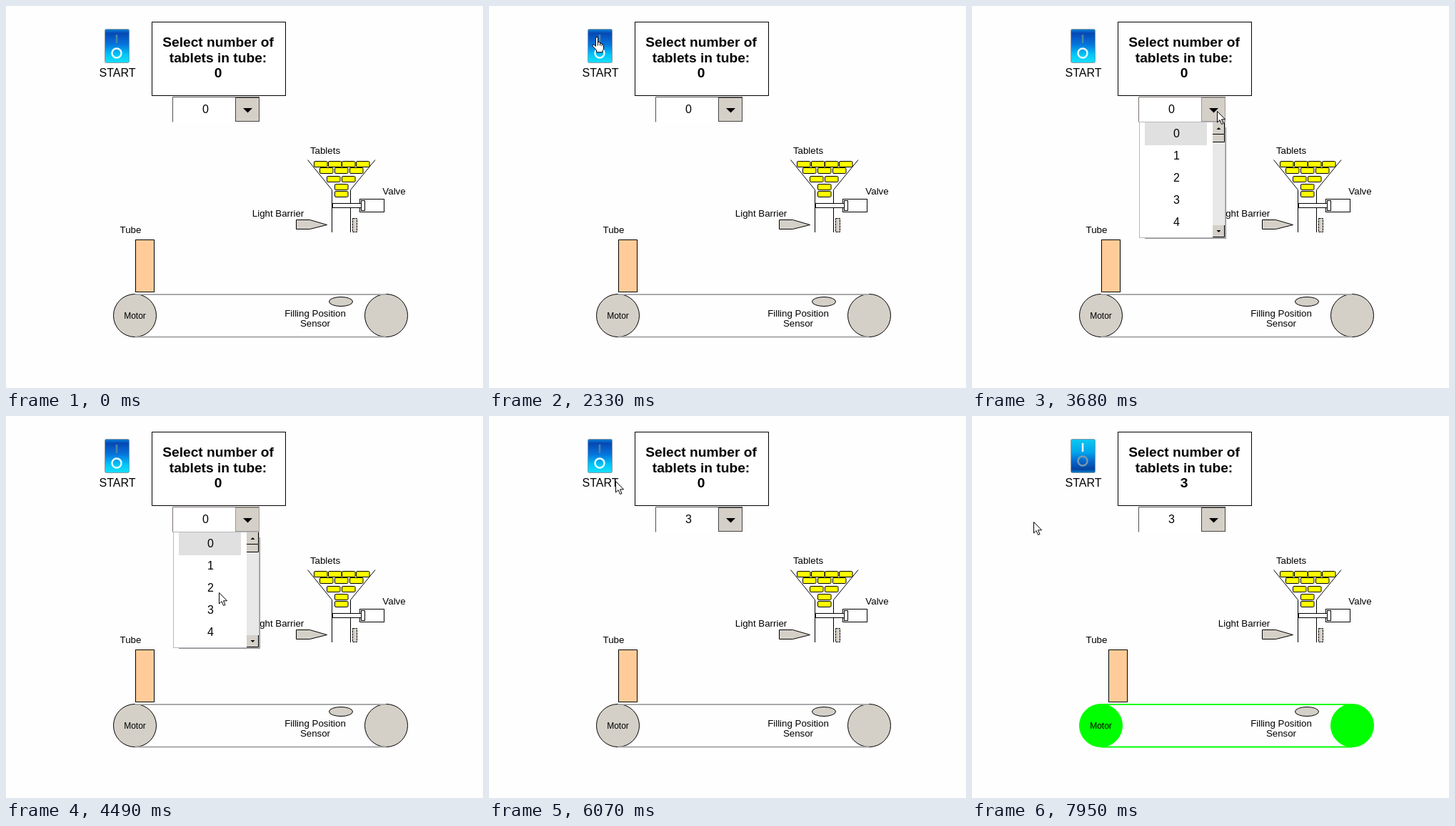
Write an HTML page that moves like this. It is 668x535 px and loops after 8 s.

```html
<!DOCTYPE html>
<html lang="en">
<head>
<meta charset="utf-8">
<title>Tablet filling line</title>
<style>
  html, body { margin: 0; width: 100%; height: 100%; overflow: hidden; background: #fefefe; }
  svg { display: block; width: 668px; height: 535px; }
  text { font-family: "Liberation Sans", Arial, sans-serif; font-size: 13.3px; text-anchor: middle; }
  .big { font-size: 16px; }
  .title { font-size: 19.2px; font-weight: bold; }
  .line { fill: none; stroke: #000; }
  .box { fill: #fff; stroke: #000; }
  .metal { fill: #d4d0c8; stroke: #000; }
  .wheel { fill: #d4d0c8; stroke: #000; }
  .belt { stroke: #a9a9ac; stroke-width: 2; }
  .running .wheel { fill: #0f0; stroke: #0f0; }
  .running .belt { stroke: #0f0; }
  .tablet { fill: #ff0; stroke: #000; }
</style>
</head>
<body>
<svg viewBox="0 0 668 535">
  <defs>
    <linearGradient id="glow" x2="0" y2="1">
      <stop offset="0" stop-color="#0a86d8"/>
      <stop offset=".12" stop-color="#0648b4"/>
      <stop offset=".45" stop-color="#0674dc"/>
      <stop offset=".75" stop-color="#00c4f8"/>
      <stop offset="1" stop-color="#18e0f8"/>
    </linearGradient>
    <linearGradient id="glowOn" x2="0" y2="1">
      <stop offset="0" stop-color="#10c8f0"/>
      <stop offset=".4" stop-color="#00a4ec"/>
      <stop offset=".65" stop-color="#0668cc"/>
      <stop offset=".9" stop-color="#0444a0"/>
      <stop offset="1" stop-color="#0a86d0"/>
    </linearGradient>
  </defs>

  <rect id="face" x="138.5" y="32.5" width="34" height="47" rx="2" stroke="#8a9ca8"/>
  <path id="onMark" d="M155 40V52" stroke-width="2.5"/>
  <circle id="offMark" cx="155" cy="66" r="6.5" fill="none" stroke-width="2.5"/>
  <text class="big" x="156" y="99">START</text>

  <rect class="box" x="204.5" y="22.5" width="187" height="103"/>
  <text class="title" x="297" y="57">Select number of</text>
  <text class="title" x="297" y="79">tablets in tube:</text>
  <text class="title" id="count" x="297" y="100">0</text>

  <text x="447" y="207">Tablets</text>
  <g id="tablets"></g>
  <path class="line" d="M422.5 215.5L456.5 257.5V317M517 215.5L482.5 257.5V317"/>
  <rect class="box" x="495.5" y="270.5" width="34" height="18"/>
  <rect class="box" x="457.5" y="276.5" width="40" height="6"/>
  <rect class="box" x="497.5" y="272.5" width="5" height="14"/>
  <text x="543.5" y="264">Valve</text>
  <text x="381" y="295">Light Barrier</text>
  <path class="metal" d="M406.5 299.5H425.5L449.5 306.5L425.5 312.5H406.5Z"/>
  <rect class="metal" x="485.5" y="297.5" width="6" height="19" stroke-dasharray="3 1"/>

  <text x="174.5" y="318">Tube</text>
  <rect id="tube" x="181.5" y="327.5" width="26" height="73" fill="#fc9" stroke="#000"/>
  <g id="conveyor">
    <circle class="wheel" cx="180.5" cy="433.5" r="30"/>
    <circle class="wheel" cx="532.5" cy="433.5" r="30"/>
    <path class="belt" d="M181 404H532M181 463.5H532"/>
  </g>
  <text x="180.5" y="438" style="font-size:12px">Motor</text>
  <ellipse class="metal" cx="469" cy="414" rx="16.5" ry="6.5"/>
  <text x="433" y="435">Filling Position</text>
  <text x="433" y="449">Sensor</text>

  <rect x="233" y="127" width="123" height="35" fill="#fff"/>
  <path id="frame" d="M233.5 162.5V127.5H355" fill="none"/>
  <rect id="arrowButton" x="321.5" y="128.5" width="33" height="33" fill="#d4d0c8"/>
  <path d="M332 143H345L338.5 149.5Z"/>
  <text class="big" id="value" x="279.5" y="150">0</text>

  <g id="list">
    <path d="M242 325.5H355.5V170" fill="none" stroke="#8c8c8c"/>
    <rect x="234.5" y="162.5" width="120" height="162" fill="#fff" stroke="#b8b8c0"/>
    <rect id="highlight" x="242" y="163" width="87" height="32" fill="#e0e0e0"/>
    <g id="options"></g>
    <rect x="337" y="163" width="17" height="161" fill="#e8e8e8"/>
    <g fill="#d4d0c8">
      <path d="M337 163H354V179H337ZM337 180H354V190H337ZM337 307H354V323H337Z"/>
    </g>
    <path class="line" d="M337 179.5H353.5V163M337 190.5H353.5V180M337 323.5H353.5V307"/>
    <path d="M342.5 173H348.5L345.5 170ZM342.5 314H348.5L345.5 317Z"/>
  </g>

  <g id="cursor" fill="#fff" stroke="#000" stroke-linejoin="round">
    <path id="arrow" d="M.5 .5V16L4 12.6L6.6 18.5L9 17.5L6.5 11.8H11.5Z"/>
    <path id="hand" transform="translate(-5)" d="M5.5 13V2q0-1.5 1.5-1.5T8.5 2V9V8q1.5-1.2 3 0v1.5q1.5-1 2.6 .3v1q2.2-.6 2.4 1v4.5q0 2-1.5 3.5v2H6.5V19L1.2 13.2q-.8-1.6 .6-2.2 1.5-.3 3.7 2.5zM8.5 9v3.5M11.5 9.5v3M14.1 10.8v2.5"/>
  </g>
</svg>
<script>
const $ = id => document.getElementById(id);
const LOOP = 8000;
const STARTED = 7320;

const tabletRows = [[218, 431, 451, 470, 490], [227, 439, 460, 481], [239, 449, 470], [250, 460], [260, 460]];
$('tablets').innerHTML = tabletRows.map(([y, ...xs]) => xs.map(x =>
  `<rect class="tablet" x="${x + .5}" y="${y - .5}" width="18.5" height="8" rx="1.5"/>`).join('')).join('');
$('options').innerHTML = [0, 1, 2, 3, 4].map(n =>
  `<text class="big" x="286.5" y="${184 + 31 * n}">${n}</text>`).join('');

// Each move: start, end, number of steps, from x, y, to x, y
const moves = [
  [770, 770, 1, 34, 465, 34, 465],
  [1760, 2330, 13, -12, -4, 149, 43],
  [2550, 3180, 13, 149, 43, 334, 144],
  [3400, 3490, 3, 334, 144, 343, 147],
  [3910, 4490, 13, 343, 147, 298, 247],
  [4850, 5070, 5, 298, 247, 290, 264],
  [5800, 6070, 7, 290, 264, 177, 91],
  [6110, 6200, 2, 177, 91, 149, 27],
  [6870, 7000, 3, 153, 16.5, 153, 48],
  [7770, 7950, 5, 153, 48, 86, 148]
];
const within = (t, from, to) => t >= from && t < to;
const show = (id, on) => $(id).setAttribute('visibility', on ? 'visible' : 'hidden');
const set = (id, attrs) => { for (const k in attrs) $(id).setAttribute(k, attrs[k]); };

function drawCursor(t) {
  const visible = within(t, 770, 810) || within(t, 1760, 6420) || t >= 6870;
  $('cursor').style.display = visible ? '' : 'none';
  if (!visible) return;
  const [start, end, steps, x0, y0, x1, y1] = moves.findLast(m => m[0] <= t);
  const step = end > start ? Math.floor((t - start) / (end - start) * (steps - 1) + 1e-6) + 1 : steps;
  const p = Math.min(1, step / steps);
  const x = Math.round(x0 + (x1 - x0) * p), y = Math.round(y0 + (y1 - y0) * p);
  const overButton = within(x, 136, 175) && within(y, 26, 81);
  set('cursor', { transform: `translate(${x} ${y})` });
  show('hand', overButton || t < 810);
  show('arrow', !(overButton || t < 810));
}

function drawSwitch(on) {
  set('face', { fill: on ? 'url(#glowOn)' : 'url(#glow)' });
  set('onMark', { stroke: on ? '#fff' : '#4c84a8', transform: `translate(0 ${on ? -2 : 0})` });
  set('offMark', { stroke: on ? '#7898b0' : '#e8fcff', transform: `translate(0 ${on ? -3 : 0})` });
}

function drawSelector(t) {
  const open = within(t, 3680, 5430);
  $('list').style.display = open ? '' : 'none';
  set('highlight', { y: t >= 5300 ? 256 : 163 });
  set('frame', { stroke: open ? '#77706c' : '#505050' });
  set('arrowButton', { stroke: open ? '#a09a94' : '#484440' });
  $('value').textContent = t >= 5430 ? 3 : 0;
}

function draw(t) {
  const running = t >= STARTED;
  drawSwitch(running);
  drawSelector(t);
  $('count').textContent = running ? 3 : 0;
  $('conveyor').classList.toggle('running', running);
  const tubeShift = running ? 2 + 4 * Math.floor((t - STARTED) / 220) : 0;
  set('tube', { x: 181.5 + Math.min(tubeShift, 10) });
  drawCursor(t);
}

const origin = performance.now();
function tick() {
  draw((performance.now() - origin) % LOOP);
  requestAnimationFrame(tick);
}
tick();
</script>
</body>
</html>
```
